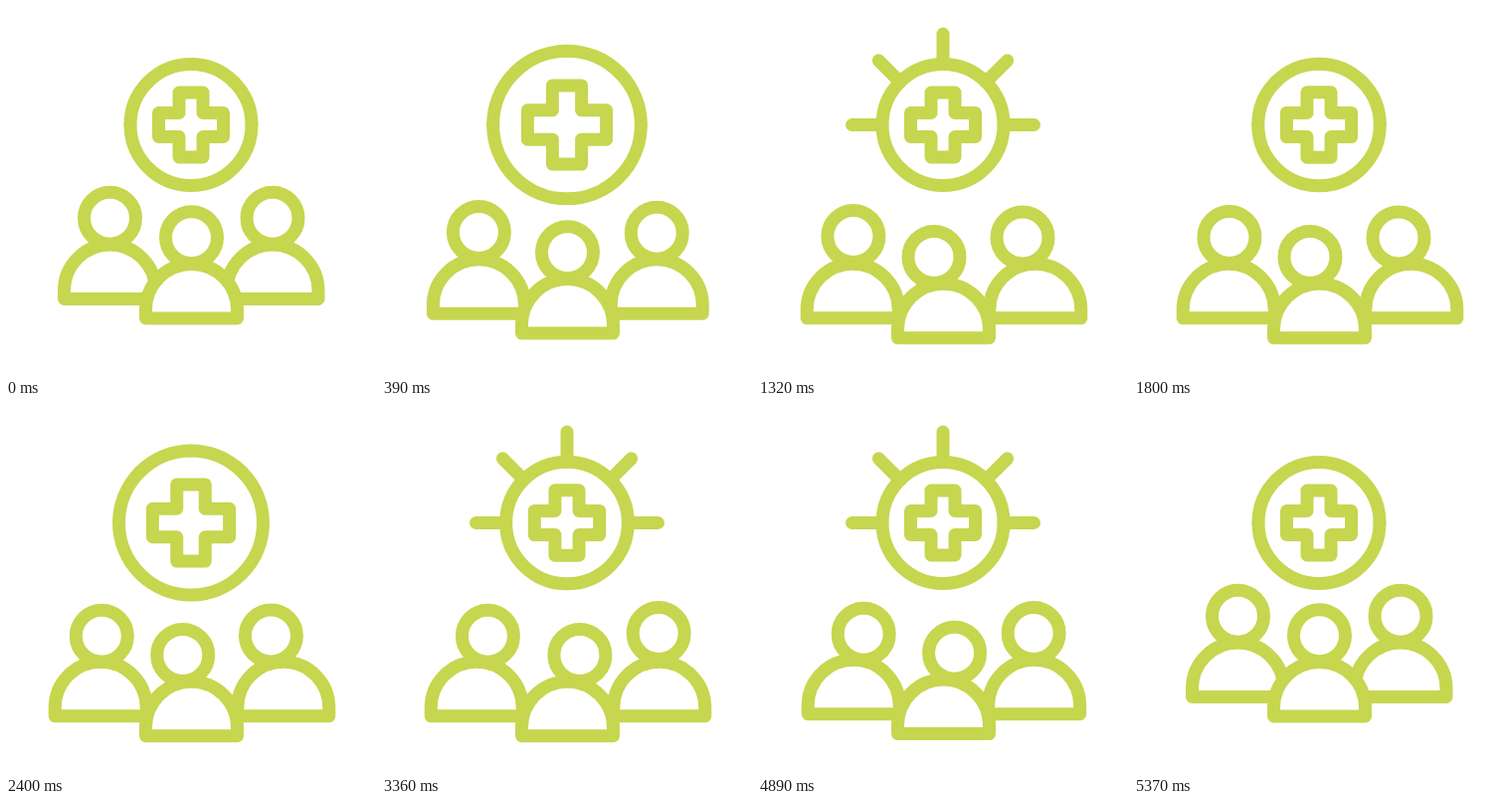
An HTML page for the animation above (5400 ms loop, 372x372 px).

```html
<!DOCTYPE html>
<html lang="en">
<head>
<meta charset="utf-8">
<title>Community care</title>
<style>
  html, body { margin: 0; width: 100%; height: 100%; overflow: hidden; background: #fff; }
  svg { display: block; width: 100vw; height: 100vh; }
  .ink { fill: none; stroke: #c6d64f; stroke-width: 13; stroke-linecap: round; stroke-linejoin: round; }
  .body { fill: #fff; }
</style>
</head>
<body>
<svg viewBox="0 0 372 372">
  <g class="ink" id="badge" transform="translate(186 119.5)">
    <path id="rays"/>
    <circle id="ring"/>
    <path id="cross"/>
  </g>
  <g class="ink" id="people"></g>
</svg>
<script>
const LOOP = 5400;
const RING = 61, RAY_TIP = 91.5;
const el = id => document.getElementById(id);

// Tracks are lists of [time, value]; values ease smoothly between neighbours.
const scale = [[0, 1], [450, 1.23], [900, .83], [1250, 1], [1740, 1], [2440, 1.19],
  [2900, .83], [3240, 1], [3340, 1.005], [3950, 1.2], [4400, .83], [4760, 1]];
const rayGrow = [[640, 0], [880, 1], [1690, 1], [1790, 0], [2760, 0], [2900, 1],
  [3410, 1], [3530, 0], [4160, 0], [4400, 1], [5110, 1], [5270, 0]];
const spread = [[0, 0], [570, 1], [4770, 1], [5370, 0]];

// Each person: home position, shift when spread, head lean and head bob.
const people = [
  { x: 104.5, y: 294.5, dx: -9.3, dy: 19.3,
    lean: [[600, 0], [1100, .7], [2330, .7], [2960, 11.2]],
    bob: [[0, 0], [600, -1], [1300, -1], [2260, .8]] },
  { x: 268, y: 294.5, dx: 10.8, dy: 19.3,
    lean: [[590, 0], [1140, -12.8], [2330, -12.8], [2960, -.6]],
    bob: [[0, 0], [600, .5], [2400, .5], [3200, -2], [3480, -2], [4540, 0]] },
  { x: 186.5, y: 314, dx: 0, dy: 19.7,
    lean: [[590, 0], [1140, -9.5], [2330, -9.5], [2980, 12.4]],
    bob: [[0, 0]] }
];

function at(track, t) {
  if (t <= track[0][0]) return track[0][1];
  for (let i = 1; i < track.length; i++) {
    const [t0, a] = track[i - 1], [t1, b] = track[i];
    if (t < t1) {
      const u = (t - t0) / (t1 - t0);
      return a + (b - a) * u * u * (3 - 2 * u);
    }
  }
  return track[track.length - 1][1];
}

function add(tag, attrs) {
  const node = document.createElementNS("http://www.w3.org/2000/svg", tag);
  for (const key in attrs) node.setAttribute(key, attrs[key]);
  return el("people").appendChild(node);
}

for (const p of people) {
  p.body = add("path", { class: "body", d: "M-46 0V-8.5A46 46 0 0 1 46 -8.5V0Z" });
  p.head = add("circle", { r: 26 });
}

function crossPath(s) {
  const a = 12 * s, b = 32.5 * s;
  return `M${-a} ${-b}H${a}V${-a}H${b}V${a}H${a}V${b}H${-a}V${a}H${-b}V${-a}H${-a}Z`;
}

function rayPath(from, to) {
  let d = "";
  for (let i = 0; i < 5; i++) {
    const angle = Math.PI * (1 + i / 4);
    const c = Math.cos(angle), s = Math.sin(angle);
    d += `M${c * from} ${s * from}L${c * to} ${s * to}`;
  }
  return d;
}

function draw(t) {
  const s = at(scale, t), r = RING * s;
  el("ring").setAttribute("r", r);
  el("cross").setAttribute("d", crossPath(s));
  el("rays").setAttribute("d", rayPath(r, r + (RAY_TIP - r) * at(rayGrow, t)));

  const k = at(spread, t);
  for (const p of people) {
    const x = p.x + p.dx * k, y = p.y + p.dy * k;
    const hx = x + at(p.lean, t) * k, hy = y - 81.3 + at(p.bob, t) * k;
    p.body.setAttribute("transform", `translate(${x} ${y})`);
    p.head.setAttribute("transform", `translate(${hx} ${hy})`);
  }
}

const start = performance.now();
function tick() {
  draw((performance.now() - start) % LOOP);
  requestAnimationFrame(tick);
}
draw(0);
requestAnimationFrame(tick);
</script>
</body>
</html>
```
